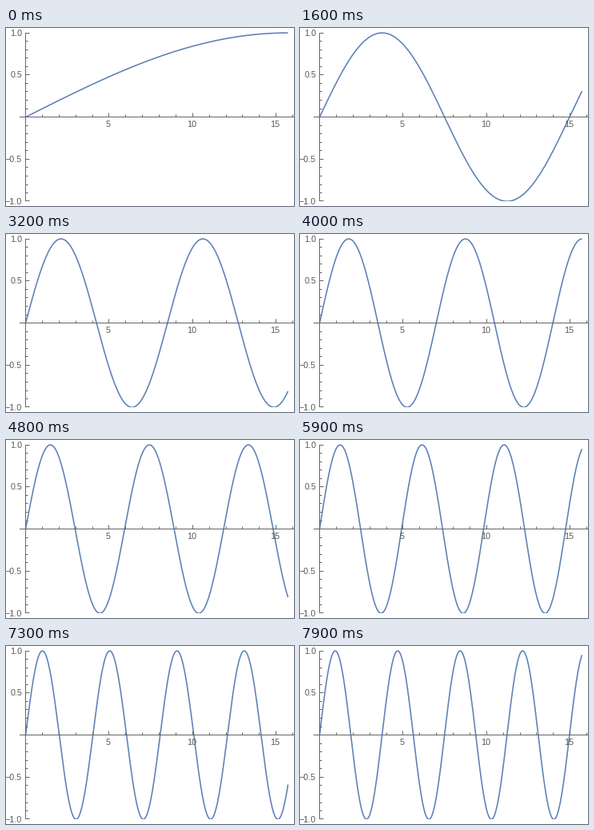
Recreate the animation shown at these times as a matplotlib script. Size 360 by 223 pixels, loop 8000 ms.

```python
import numpy as np
import matplotlib.pyplot as plt
from matplotlib.animation import FuncAnimation
from matplotlib.patches import Rectangle

W, H, DPI = 360, 223, 100
PT = 72 / DPI                      # points per pixel
X0, Y0 = 24.5, 111.6               # pixel position of the origin
SX, SY = 20.88, 105.5              # pixels per unit
BOTTOM = 217                       # lower edge of the plot
FRAMES, STEP_MS = 80, 100
BLUE, GREY, INK = "#5e81b5", "#666666", "#585858"

fig = plt.figure(figsize=(W / DPI, H / DPI), dpi=DPI, facecolor="white")
ax = fig.add_axes([0, 0, 1, 1])
ax.set_xlim(0, W)
ax.set_ylim(H, 0)
ax.axis("off")


def px(x):
    return X0 + SX * x


def py(y):
    return Y0 - SY * y


def crisp(v):
    return np.floor(v) + 0.5


def rule(x1, y1, x2, y2):
    ax.plot([x1, x2], [y1, y2], color=GREY, lw=PT, zorder=3,
            solid_capstyle="butt", snap=False)


def label(x, y, text, align):
    ax.text(x, y, text, color=INK, family="Liberation Sans",
            size=10.8 * PT, ha=align, va="baseline", zorder=4)


def tick_length(i):
    return 5 if i % 5 == 0 else 3


axis_y = crisp(Y0)
rule(17, axis_y, W, axis_y)
rule(X0, 6, X0, BOTTOM)

for i in range(1, 17):
    x = crisp(px(i))
    rule(x, axis_y, x, axis_y - tick_length(i))
    if i % 5 == 0:
        label(px(i) - 1, 124, str(i), "center")

for i in range(-10, 11):
    y = min(crisp(py(i / 10)), BOTTOM - 0.5)
    rule(X0, y, X0 + tick_length(i), y)
    if i and i % 5 == 0:
        label(20, py(i / 10) + 3.5,
              f"{i / 10:.1f}".replace("-", "\u2212"), "right")

xs = np.linspace(0, 5 * np.pi, 800)
curve, = ax.plot([], [], color=BLUE, lw=1.6 * PT, zorder=2,
                 solid_capstyle="butt", solid_joinstyle="round")
curve.set_clip_path(Rectangle((0, 0), W, BOTTOM, transform=ax.transData))


def draw(n):
    freq = 0.1 + 0.02 * n
    curve.set_data(px(xs), py(np.sin(freq * xs)))
    return curve,


anim = FuncAnimation(fig, draw, frames=FRAMES, interval=STEP_MS,
                     repeat=True, repeat_delay=0)
plt.show()
```
